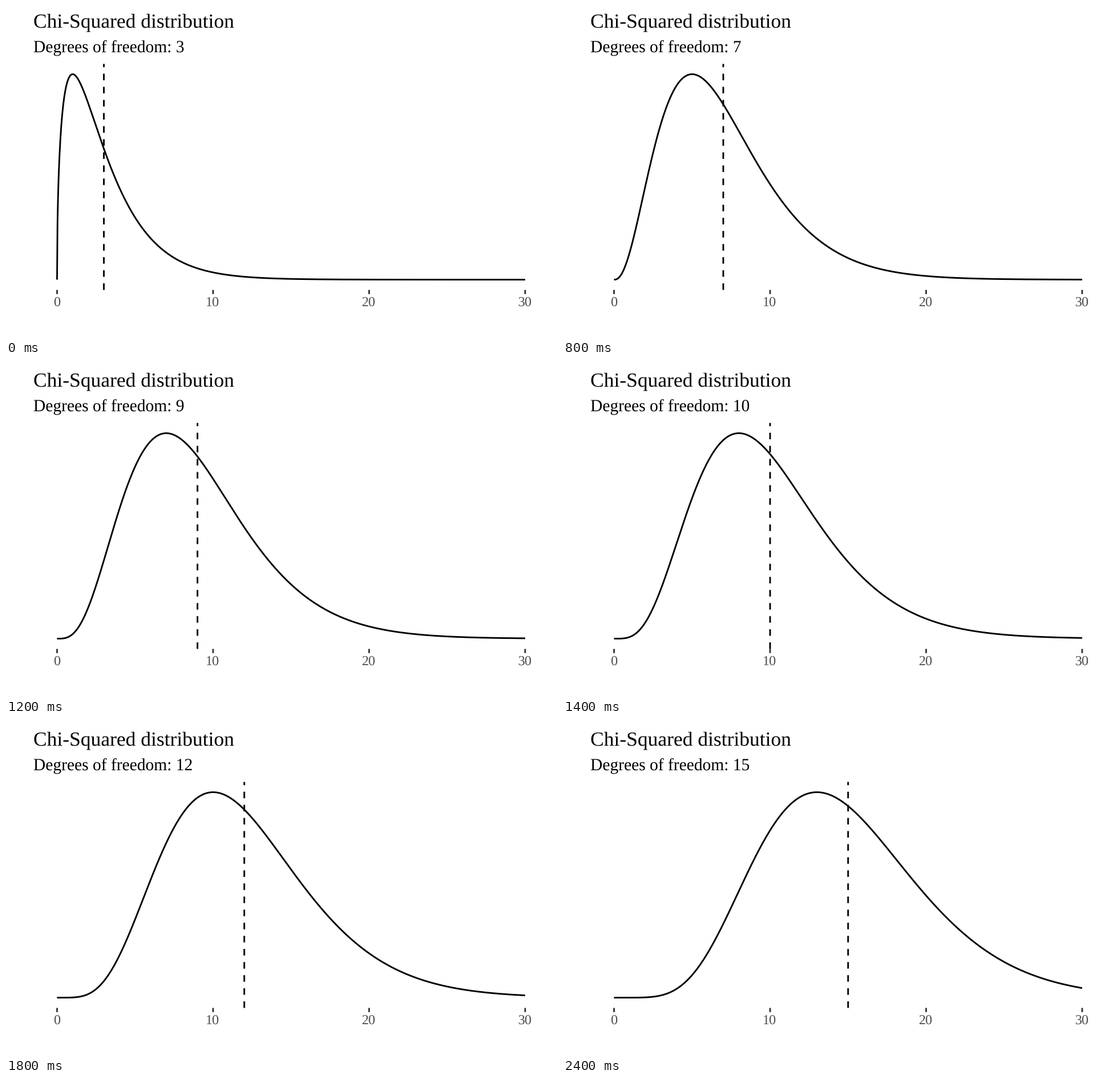
A matplotlib script that plays this animation: 966 by 580 pixels, repeating every 2.6 s.

```python
import matplotlib.pyplot as plt
import numpy as np
from matplotlib.animation import FuncAnimation

WIDTH, HEIGHT, DPI = 966, 580, 100
PT = 72 / DPI                      # points per pixel
STROKE = 2.87 * PT
BASE_SIZE = 29.56 * PT

LEFT, UNIT = 89.5, 27.355          # x = 0 and one axis unit, in pixels
PANEL_TOP, PANEL_BOTTOM = 101.5, 497.5
CURVE_TOP, CURVE_BOTTOM = 119.5, 479.5
TICK_LENGTH = 7.33

FIRST_DF, LAST_DF = 3, 15
INTERVAL = 200

plt.rcParams["font.family"] = "Liberation Serif"
plt.rcParams["text.hinting"] = "none"

fig = plt.figure(figsize=(WIDTH / DPI, HEIGHT / DPI), dpi=DPI, facecolor="white")
ax = fig.add_axes([0, 0, 1, 1])
ax.set(xlim=(0, WIDTH), ylim=(HEIGHT, 0))
ax.axis("off")


def to_px(value):
    return LEFT + UNIT * value


def add_line(xs, ys, color="black", **style):
    line, = ax.plot(xs, ys, color=color, lw=STROKE, solid_capstyle="butt",
                    dash_capstyle="butt", snap=False, **style)
    return line


def add_text(x, baseline, text, scale=1.0, color="black", ha="left"):
    return ax.text(x, baseline, text, fontsize=BASE_SIZE * scale, color=color,
                   ha=ha, va="baseline")


def scaled_density(x, df):
    """Chi-squared density divided by its value at the mode."""
    mode = df - 2
    return (x / mode) ** (mode / 2) * np.exp((mode - x) / 2)


add_text(48.3, 38, "Chi-Squared distribution", 1.2)
subtitle = add_text(48.3, 81, "")

for tick in range(0, 31, 10):
    x_tick = to_px(tick)
    add_line([x_tick] * 2, [PANEL_BOTTOM, PANEL_BOTTOM + TICK_LENGTH], "#333333")
    add_text(x_tick - 0.6, 526.4, str(tick), 0.82, "#4d4d4d", "center")

x = np.linspace(0, 30, 1001)
curve = add_line(to_px(x), np.full_like(x, CURVE_BOTTOM), solid_joinstyle="round")
mean_line = add_line([LEFT] * 2, [PANEL_BOTTOM, PANEL_TOP], linestyle=(0, (4, 4)))


def update(frame):
    df = FIRST_DF + frame
    subtitle.set_text(f"Degrees of freedom: {df}")
    curve.set_ydata(CURVE_BOTTOM - (CURVE_BOTTOM - CURVE_TOP) * scaled_density(x, df))
    mean_line.set_xdata([to_px(df)] * 2)
    return subtitle, curve, mean_line


anim = FuncAnimation(fig, update, frames=LAST_DF - FIRST_DF + 1,
                     interval=INTERVAL, repeat=True, repeat_delay=0)
plt.show()
```
